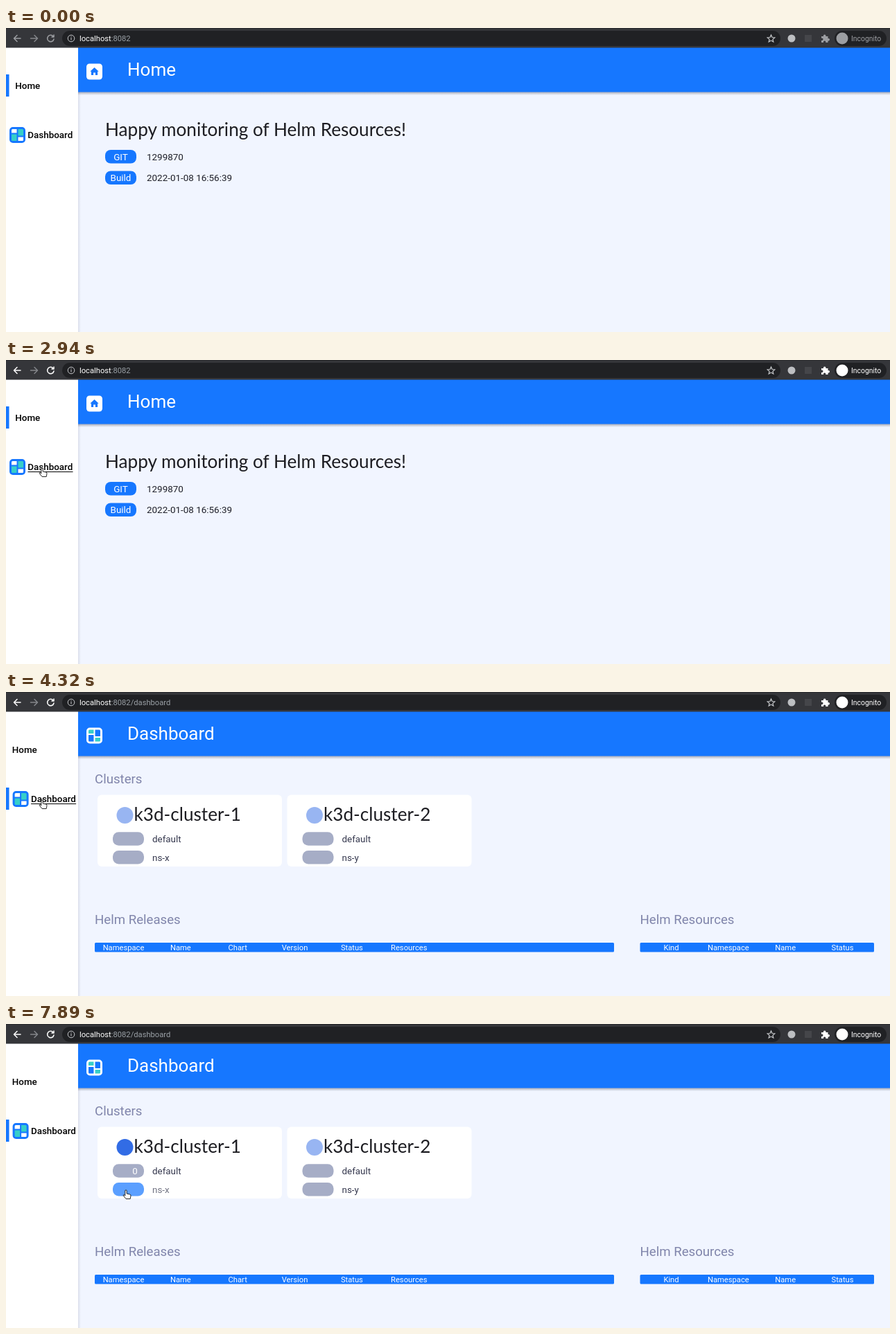
An HTML page for the animation above (8000 ms loop, 1275 px wide and 439 px high).

```html
<!DOCTYPE html>
<html lang="en">
<head>
<meta charset="utf-8">
<title>Helm dashboard</title>
<style>
  html, body { margin: 0; width: 100%; height: 100%; overflow: hidden; background: #f1f5ff; }
  svg { display: block; width: 1275px; height: 439px; font-family: Roboto, sans-serif; }
  .title { font-size: 26px; fill: #fff; }
  .nav { font-size: 13.4px; font-weight: 500; fill: #000; }
  .lato { font: 26.15px Lato, sans-serif; fill: #1d1d22; }
  .body { font-size: 13.45px; fill: #1f2029; }
  .section { font-size: 18.65px; fill: #8085ab; }
  .col { font-size: 11.2px; fill: #fff; text-anchor: middle; }
  .label { font-size: 13.4px; fill: #35384e; }
  .mid { text-anchor: middle; }
  .white { fill: #fff; }
  .blue { fill: #1677ff; }
  .line { fill: none; stroke-width: 1.5; stroke-linecap: round; stroke-linejoin: round; }
</style>
</head>
<body>
<svg viewBox="0 0 1275 439">
  <defs>
    <linearGradient id="below" x2="0" y2="1">
      <stop stop-color="#334" stop-opacity=".4"/><stop offset="1" stop-color="#334" stop-opacity="0"/>
    </linearGradient>
    <linearGradient id="beside">
      <stop stop-color="#446" stop-opacity=".13"/><stop offset="1" stop-color="#446" stop-opacity="0"/>
    </linearGradient>
    <g id="tiles">
      <path d="M3 4.5q0-1.5 1.5-1.5h6v5.5H3zM12.5 14.5H20v4q0 1.5-1.5 1.5h-6z"/>
      <path d="M12.5 3h6q1.500 0 1.500 1.500v8h-7.500zM3 10.500h7.500V20h-6q-1.500 0-1.500-1.500z" fill="var(--tall)"/>
    </g>
  </defs>

  <rect width="1275" height="439" fill="#f1f5ff"/>
  <rect x="104" y="92" width="4" height="347" fill="url(#beside)"/>
  <rect x="104" y="92" width="1171" height="5" fill="url(#below)"/>
  <rect x="104" y="28" width="1171" height="64.500" class="blue"/>
  <rect y="28" width="104" height="411" fill="#fff"/>

  <!-- Browser bar -->
  <rect width="1275" height="28.500" fill="#35363a"/>
  <rect width="1275" height="1" fill="#292a2d"/>
  <rect x="424" width="187" height="1" fill="#1e1f22"/>
  <g fill="#202124">
    <rect x="81" y="4" width="1036" height="22" rx="11"/>
    <rect x="1195" y="4" width="75" height="22" rx="11"/>
  </g>
  <path class="line" stroke="#85878b" d="M35.500 15h9.500M41 10.500l4.500 4.500-4.500 4.500"/>
  <g id="tools">
    <path class="line" stroke="currentColor" d="M21 15h-9.500M16 10.500 11.500 15l4.500 4.500M68.200 12.300a4.700 4.700 0 1 0 .8 3.700M69 10v3h-3"/>
    <circle cx="1206" cy="15" r="8.500" fill="currentColor"/>
    <path fill="currentColor" d="M1176 12h3a1.800 1.800 0 1 1 3.400 0h3.100v3.200a1.800 1.800 0 1 1 0 3.300V21h-3.300a1.700 1.700 0 1 0-3 0H1176v-3.200a1.700 1.700 0 1 0 0-3z"/>
    <text x="1219" y="18.800" font-size="10.400" fill="currentColor">Incognito</text>
  </g>
  <g fill="none" stroke="#c6c8cb">
    <circle cx="94" cy="15" r="4.800"/><path d="M94 14v3.500M94 12v1.200"/>
    <path stroke-width="1.200" d="m1103.500 10 1.500 3.500 3.800.4-2.900 2.500.9 3.700-3.300-2-3.300 2 .9-3.700-2.900-2.500 3.800-.4z"/>
  </g>
  <circle cx="1133" cy="15" r="5.500" fill="#bdbfc2"/>
  <rect x="1152" y="10" width="10" height="10" fill="#45464a"/>
  <text x="106" y="18.700" font-size="11.200" fill="#9aa0a6"><tspan fill="#fff">localhost</tspan>:8082<tspan id="path">/dashboard</tspan></text>

  <!-- Sidebar -->
  <rect id="marker" width="4.500" height="32" class="blue"/>
  <text id="navHome" y="88" class="nav">Home</text>
  <g id="navDash">
    <rect x="5" y="143" width="23" height="23" rx="5" class="blue"/>
    <use href="#tiles" x="5" y="143" fill="#fff" style="--tall:#36cfc9"/>
    <text x="31.300" y="159" class="nav">Dashboard</text>
    <path id="underline" stroke="#000" d="M31.500 161.500h65"/>
  </g>

  <g id="home">
    <rect x="116" y="51.500" width="23" height="23" rx="4.500" fill="#fff"/>
    <path class="blue" d="m127.500 57 6.200 5.800h-1.600v5.200h-3.200v-3.500h-2.800V68h-3.200v-5.200h-1.600z"/>
    <text x="175" y="69" class="title">Home</text>
    <text x="143" y="155.500" class="lato">Happy monitoring of Helm Resources!</text>
    <rect x="143" y="176" width="45" height="19.500" rx="8" class="blue"/>
    <rect x="143" y="206.500" width="45" height="19.500" rx="8" class="blue"/>
    <g class="body">
      <text x="165.500" y="190.500" class="mid white">GIT</text>
      <text x="165.500" y="221" class="mid white">Build</text>
      <text x="203" y="190.500">1299870</text>
      <text x="203" y="221">2022-01-08 16:56:39</text>
    </g>
  </g>

  <g id="dashboard">
    <rect x="116" y="51.500" width="23" height="23" rx="5" fill="#fff"/>
    <use href="#tiles" x="116" y="51.500" fill="#36cfc9" style="--tall:#1677ff"/>
    <text x="175" y="69" class="title">Dashboard</text>
    <g class="section">
      <text x="128" y="132">Clusters</text>
      <text x="128" y="334.500">Helm Releases</text>
      <text x="914.500" y="334.500">Helm Resources</text>
    </g>
    <g id="tables"></g>
    <g id="spinner" class="blue"></g>
    <g id="clusters"></g>
  </g>

  <g id="cursor">
    <path id="arrow" stroke="#fff" stroke-width=".8" d="M0 0v11l2.600-2.300 1.900 4.200 1.900-.8-1.900-4.200h3.700z"/>
    <path id="hand" fill="#fff" stroke="#111" stroke-width=".9" d="M-1.200 1a1.200 1.200 0 0 1 2.400 0v4l4.500 1q1.600.500 1.300 2l-.8 4.500h-6.200L-3.600 8q-.6-1.300.6-1.500L-1.200 8z"/>
  </g>
</svg>
<script>
const LOOP = 8000, STEP = 30;
const FOCUS = 2100, OPEN = 3510, LOADED = 4320, PICK_1 = 5850, COUNTED = 6240, PICK_2 = 7800;
const $ = id => document.getElementById(id);
const show = (id, on) => $(id).style.display = on ? '' : 'none';

function table(x, width, first, names) {
  const heads = names.map((n, i) => `<text class="col" x="${first + i * 82.35}" y="372.500">${n}</text>`);
  return `<rect class="blue" x="${x}" y="362" width="${width}" height="13.500" rx="1.500"/>` + heads.join('');
}
$('tables').innerHTML =
  table(128, 749, 169.500, ['Namespace', 'Name', 'Chart', 'Version', 'Status', 'Resources']) +
  table(914.500, 337.500, 959.500, ['Kind', 'Namespace', 'Name', 'Status']);

function namespaceRow(id, name, y) {
  return `<g id="${id}"><rect x="154" y="${y}" width="45" height="19.500" rx="8.500"/>
    <text class="label" x="211" y="${y + 14.700}">${name}</text></g>`;
}
function cluster(n, second) {
  return `<g transform="translate(${(n - 1) * 273.500})" fill="#a6adc6">
    <rect x="132" y="148.500" width="266" height="103.500" rx="6" fill="#fff"/>
    <circle id="logo${n}" cx="171.500" cy="178" r="12" fill="#326ce5" opacity=".5"/>
    <text class="lato" x="184.500" y="185.500">k3d-cluster-${n}</text>
    ${namespaceRow('default' + n, 'default', 202.300)}${namespaceRow('other' + n, second, 229)}</g>`;
}
$('clusters').innerHTML = cluster(1, 'ns-x') + cluster(2, 'ns-y') +
  '<text id="count" class="label mid white" x="186" y="217">0</text>';

// Grid loader: delay and half period of each dot, in ms
const dots = [[545, 400], [44, 376], [620, 500], [446, 500], [53, 366], [700, 450], [45, 364], [317, 400], [226, 400]]
  .map(([delay, half], i) => {
    const el = document.createElementNS('http://www.w3.org/2000/svg', 'circle');
    el.setAttribute('cx', 148.500 + i % 3 * 40.400);
    el.setAttribute('cy', 165 + Math.floor(i / 3) * 40.400);
    $('spinner').append(el);
    return { el, delay, half };
  });

// CSS "ease": cubic-bezier(.25, .1, .25, 1)
function ease(x) {
  let lo = 0, hi = 1, s;
  for (let i = 0; i < 24; i++) {
    s = (lo + hi) / 2;
    if (.75 * s * (1 - s) + s ** 3 < x) lo = s; else hi = s;
  }
  return .3 * s * (1 - s) ** 2 + 3 * s * s * (1 - s) + s ** 3;
}

const route = [[390, 250, 440], [1080, 90, 190], [1200, 90, 190], [1800, 70, 146], [1980, 66, 150], [2070, 66, 150],
  [2370, 52, 156], [4740, 52, 156], [5130, 171, 206], [5190, 171, 206], [5340, 180, 211], [6600, 180, 211],
  [7080, 173, 240], [LOOP, 173, 240]];
function pointer(t) {
  const i = Math.max(1, route.findIndex(p => p[0] > t));
  const [t0, x0, y0] = route[i - 1], [t1, x1, y1] = route[i];
  const u = Math.max(0, (t - t0) / (t1 - t0)), k = u * u * (3 - 2 * u);
  return [x0 + (x1 - x0) * k, y0 + (y1 - y0) * k];
}

function draw(t) {
  const [x, y] = pointer(t);
  const inside = (l, top, r, b) => x >= l && x <= r && y >= top && y <= b;
  const open = t >= OPEN, loaded = t >= LOADED, focused = t >= FOCUS;
  const overNav = focused && inside(5, 143, 101, 166);
  const over1 = loaded && inside(154, 202, 253, 222), over2 = loaded && inside(154, 229, 240, 249);

  show('home', !open);
  show('dashboard', open);
  show('path', open);
  show('spinner', !loaded);
  show('clusters', loaded);
  $('tools').style.color = focused ? '#fff' : '#9c9ea2';
  $('marker').setAttribute('y', open ? 138 : 67);
  $('navHome').setAttribute('x', open ? 8.800 : 13.300);
  $('navDash').setAttribute('transform', `translate(${open ? 4.600 : 0})`);
  show('underline', overNav);

  for (const { el, delay, half } of dots) {
    const phase = Math.max(0, t - OPEN - delay) / half;
    const e = ease(phase % 1), shrink = phase % 2 < 1 ? e : 1 - e;
    el.setAttribute('r', 18.750 * (1 - .5 * shrink));
    el.setAttribute('opacity', 1 - .3 * shrink);
  }

  const row = (id, picked, over) => {
    $(id).firstChild.setAttribute('fill', picked ? '#1677ff' : '#a6adc6');
    $(id).setAttribute('opacity', over ? .7 : 1);
  };
  row('default1', t >= PICK_1 && t < PICK_2, over1);
  row('other1', t >= PICK_2, over2);
  $('logo1').setAttribute('opacity', t >= PICK_1 ? 1 : .5);
  show('count', t >= COUNTED);

  const hand = overNav || over1 || over2;
  show('cursor', t >= 390);
  show('hand', hand);
  show('arrow', !hand);
  $('cursor').setAttribute('transform', `translate(${x} ${y})`);
}

function tick() {
  const t = performance.now() % LOOP;
  draw(t - t % STEP);
  requestAnimationFrame(tick);
}
tick();
</script>
</body>
</html>
```
